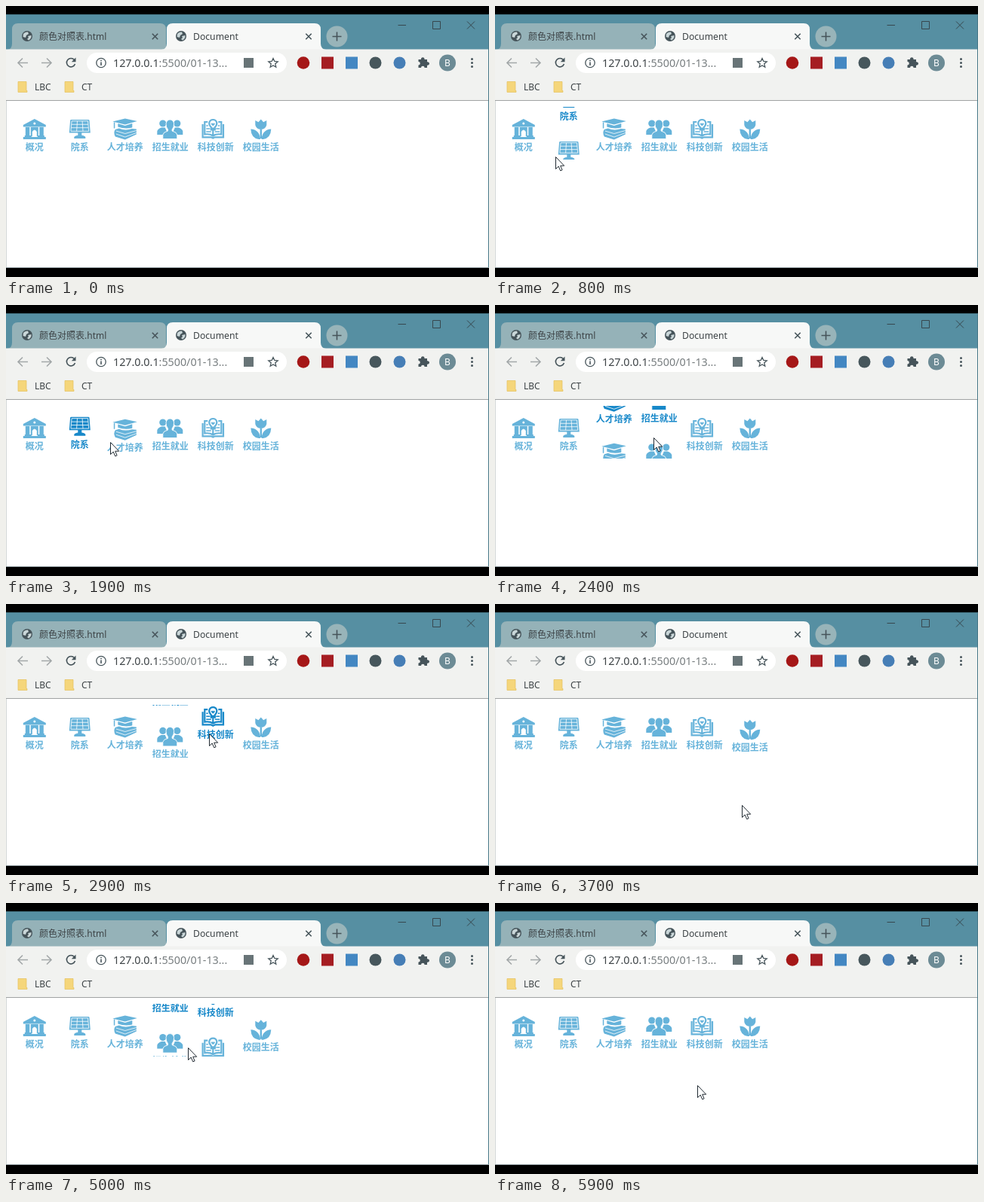
Write an HTML page that moves like this. It is 640 px wide and 360 px high and loops after 6000 ms.

```html
<!DOCTYPE html>
<html lang="zh">
<head>
<meta charset="utf-8">
<title>Document</title>
<style>
html, body { margin: 0; width: 100%; height: 100%; overflow: hidden; background: #000; }
svg { display: block; }
text { font: 12px "Noto Sans", "Noto Sans CJK SC", sans-serif; fill: #3d4346; }
.label { font: bold 12px "Noto Sans CJK SC", sans-serif; text-anchor: middle; fill: currentColor; }
.url { font-size: 14.3px; }
.line { fill: none; stroke: #46545a; stroke-width: 1.6; }
.thin { stroke-width: 1; stroke: #37474e; }
.faint { stroke: #a3a8a9; }
.gap { fill: none; stroke: #fff; stroke-width: .8; }
.normal { color: #66b3da; fill: currentColor; }
.active { color: #1788c9; fill: currentColor; }
</style>
</head>
<body>
<svg id="stage" width="640" height="360" viewBox="0 0 640 360">
  <defs>
    <g id="globe">
      <circle r="7" fill="#46545a"/>
      <path d="M-5 -3Q-3 -6 1 -5.5L2 -3L-1 -1L-2 2L-5.5 1ZM1 0L5.5 -1Q6 3 2 5.5L0 4L2 2Z" fill="#c9d6d8"/>
    </g>
    <path id="cross" class="line" d="M-3.7 -3.7L3.7 3.7M3.7 -3.7L-3.7 3.7"/>
    <path id="folder" d="M0 0H11V12H12V14H0Z" fill="#f5d67b" stroke="#e6c05c" stroke-width=".7"/>

    <g id="icon0">
      <path d="M30 16L45 24V26.5H15V24Z"/>
      <path d="M18 27H23.5V39H18ZM36.5 27H42V39H36.5ZM25 27H35V39H33V33Q30 28 27 33V39H25Z"/>
      <path d="M17 38H26V40H34V38H43V40H45V43H15V40H17Z"/>
      <circle cx="30" cy="22" r="1.5" fill="#fff"/>
    </g>
    <g id="icon1">
      <path d="M18.5 17H41.5Q42.5 17 42.7 18L44 34.5H16L17.3 18Q17.5 17 18.5 17ZM27.5 34H32.5V38H27.5ZM22.5 40Q24 37.5 30 37.5T37.5 40V42H22.5Z"/>
      <path class="gap" d="M19.3 18.8H40.7L41.9 32.3H18.1ZM26.7 19L25.8 32.3M33.3 19L34.2 32.3M18.9 23.3H41.1M18.5 27.7H41.5"/>
    </g>
    <g id="icon2">
      <path d="M13.5 19.5L30 15.5L46 19L30 23.5ZM20.5 22.3L30 25L39.5 22V27.5Q30 30 20.5 26.5ZM15 20.5H16.5V28.5H15Z"/>
      <path d="M17 30L22 28.5Q30 32 39 29L45 29.5V36.5L30 43.5L17 39.5Q14 34 17 30Z"/>
      <path class="gap" d="M18 32L30 35.5L45 31.5M18 36L30 40L45 34.5"/>
    </g>
    <g id="icon3">
      <circle cx="20" cy="22" r="4.6"/>
      <circle cx="39" cy="22" r="4.6"/>
      <path d="M12.5 37V32.5Q13 29.5 18 27.5H23L27 37ZM46.5 37V32.5Q46 29.5 41 27.5H36L32 37Z"/>
      <path stroke="#fff" stroke-width=".9" d="M20 42.5V37Q20.5 33.5 26.7 32V30Q24 27 24.2 22Q25.5 17 29.5 17T34.8 22Q35 27 32.3 30V32Q38.5 33.5 39 37V42.5Z"/>
    </g>
    <g id="icon4" transform="translate(-3.5)" fill="none" stroke="currentColor" stroke-width="2.2">
      <path d="M23 20H19V36.5Q26 35.5 30 38.5Q34 35.5 41 36.5V20H37M16.3 23V40.3H27.5L30 41.5L32.5 40.3H43.7V23M30 31V39"/>
      <path d="M21 25H23.5M21 29H26M21 33H27.5M39 25H36.5M39 29H34M39 33H32.5" stroke-width="1.5"/>
      <path d="M27.5 27Q24.5 24 25 21Q26 17 30 17T35 21Q35.5 24 32.5 27V30.5H27.5ZM28 22L30 24L32 22M28 28.7H32"/>
    </g>
    <g id="icon5">
      <path d="M22.5 18L26.7 20.2L30 16.5L33.3 20.2L37.5 18V24Q36.5 29.5 30 30Q23.5 29.5 22.5 24ZM28.8 29H31.2V42H28.8Z"/>
      <path d="M16.5 29.5Q28 30 29.3 43H27Q17 41.5 16.5 29.5ZM43.5 29.5Q32 30 30.7 43H33Q43 41.5 43.5 29.5Z"/>
    </g>
  </defs>

  <rect y="11" width="640" height="337" fill="#fff"/>
  <rect y="11" width="640" height="47" fill="#568fa2"/>

  <path d="M2 58Q8 57 8 50V31Q8 23 16 23H204Q212 23 212 31V58Z" fill="#95b2b8"/>
  <path d="M206 58Q213 57 213 50V31Q213 23 221 23H409Q417 23 417 31V50Q417 57 424 58Z" fill="#f7f8f7"/>
  <rect y="57.5" width="640" height="67.5" fill="#f1f2f0"/>
  <path d="M0 125.5H640" stroke="#a0a3a3"/>
  <path d="M0 11.5H640M639.5 11V348" stroke="#477888"/>
  <path d="M0 347.5H640" stroke="#9aa6aa"/>
  <path d="M.5 126V347" stroke="#d4d8d8"/>

  <use href="#globe" x="28" y="40"/>
  <use href="#globe" x="232" y="40"/>
  <text x="44" y="45">颜色对照表.html</text>
  <text x="248" y="45" style="font-size:12.2px">Document</text>
  <use href="#cross" x="197.5" y="40.5"/>
  <use href="#cross" x="401" y="40.5"/>
  <circle cx="438.5" cy="40.5" r="14" fill="#98b4b9"/>
  <path class="line" d="M432.5 40.5H444.5M438.5 34.5V46.5"/>
  <path class="line thin" d="M519.5 25.5H530M565.5 20.5H575.5V30.5H565.5ZM611 20.5L621 30.5M621 20.5L611 30.5"/>

  <path class="line faint" d="M29 75.5H16M22 69.5L16 75.5L22 81.5M47 75.5H60M54 69.5L60 75.5L54 81.5"/>
  <path class="line" d="M90.5 71.5A5.7 5.7 0 1 0 91.5 77"/>
  <path d="M92.5 68.5V74.2H86.8Z" fill="#46545a"/>
  <rect x="107" y="62" width="265" height="27" rx="13.5" fill="#fff"/>
  <circle class="line" cx="126" cy="75.5" r="6.2" style="stroke-width:1.3"/>
  <path class="line" d="M126 74.5V79M126 71.7V73.2"/>
  <text class="url" x="142" y="80.5">127.0.0.1<tspan fill="#777d7f">:5500/01-13...</tspan></text>
  <rect x="315" y="69" width="13" height="13" fill="#687477"/>
  <path class="line" style="stroke-width:1.3" d="M354 69.5L355.8 73.5L360.2 73.9L356.8 76.8L357.8 81.2L354 78.9L350.2 81.2L351.2 76.8L347.8 73.9L352.2 73.5Z"/>

  <circle cx="394" cy="75.5" r="8.3" fill="#a51717"/>
  <rect x="418" y="67.5" width="16" height="16" fill="#a51d22"/>
  <rect x="450" y="67.5" width="16" height="16" fill="#4387c2"/>
  <circle cx="489.5" cy="75.5" r="8" fill="#47575c"/>
  <circle cx="521.5" cy="75.5" r="8" fill="#467eb6"/>
  <path d="M546.5 71H550A2.3 2.3 0 1 1 554.5 71H558V74.3A2.3 2.3 0 1 1 558 78.7V82H554.6A2.3 2.3 0 0 0 550 82H546.5V78.6A2.3 2.3 0 0 0 546.5 74Z" fill="#46545a"/>
  <circle cx="585" cy="75.5" r="11" fill="#6c8b95"/>
  <text x="585" y="80" text-anchor="middle" style="fill:#fff">B</text>
  <g fill="#46545a"><circle cx="617.5" cy="70.5" r="1.5"/><circle cx="617.5" cy="75.5" r="1.5"/><circle cx="617.5" cy="80.5" r="1.5"/></g>

  <use href="#folder" x="16" y="100.5"/>
  <use href="#folder" x="78" y="100.5"/>
  <text x="38" y="112">LBC</text>
  <text x="100" y="112">CT</text>

  <g id="menu"></g>
  <path id="cursor" d="M.5 .5V16.5L4.2 13L6.7 18.8L9.1 17.8L6.7 12.2H11.7Z" fill="#fff" stroke="#222b33" stroke-linejoin="round"/>
</svg>
<script>
const LOOP = 6000, TICK = 100, DURATION = 500;
const LEFT = 8, TOP = 134, WIDTH = 60, HEIGHT = 70;
const labels = ["概况", "院系", "人才培养", "招生就业", "科技创新", "校园生活"];

// Pointer waypoints: time, x, y
const path = [
  [100, 36, 300], [300, 52, 262], [400, 52, 262], [673, 76, 204], [800, 80, 200],
  [1300, 100, 176], [1800, 116, 180], [1876, 128, 181], [1900, 138, 182],
  [2260, 188, 178], [2650, 248, 172], [2900, 269, 172], [3020, 308, 180],
  [3362, 326, 204], [3700, 327, 267], [3900, 328, 270], [4000, 328, 270],
  [4200, 330, 204], [4450, 330, 180], [4660, 308, 184], [4893, 248, 190],
  [5000, 241, 192], [5085, 240, 204], [5400, 268, 242], [LOOP, 268, 242]
];

function pointer(t) {
  const k = Math.max(1, path.findIndex(p => p[0] >= t));
  const [t0, x0, y0] = path[k - 1], [t1, x1, y1] = path[k];
  const u = (t - t0) / (t1 - t0);
  return [x0 + (x1 - x0) * u, y0 + (y1 - y0) * u];
}

function hovered(t) {
  const [x, y] = pointer(t);
  return y >= TOP && y < TOP + HEIGHT ? Math.floor((x - LEFT) / WIDTH) : -1;
}

// CSS "ease": cubic-bezier(.25, .1, .25, 1)
function ease(x) {
  if (x <= 0) return 0;
  if (x >= 1) return 1;
  const curve = (a, b, s) => 3 * (1 - s) * s * (a * (1 - s) + b * s) + s ** 3;
  let lo = 0, hi = 1;
  for (let i = 0; i < 24; i++) {
    const mid = (lo + hi) / 2;
    if (curve(.25, .25, mid) < x) lo = mid; else hi = mid;
  }
  return curve(.1, 1, lo);
}

// Each hover change starts a transition; a reversal takes proportionally less time
const moves = labels.map(() => [{ start: 0, from: 0, to: 0, span: 1 }]);

function progress(i, t) {
  const m = moves[i].findLast(m => m.start <= t);
  return m.from + (m.to - m.from) * ease((t - m.start) / m.span);
}

function turn(i, t, to) {
  if (!moves[i]) return;
  const from = progress(i, t);
  moves[i].push({ start: t, from, to, span: DURATION * Math.abs(to - from) || 1 });
}

for (let t = path[0][0], last = -1; t < LOOP; t++) {
  const now = hovered(t);
  if (now === last) continue;
  turn(last, t, 0);
  turn(now, t, 1);
  last = now;
}

const face = (i, name, y) => `<g class="${name}" transform="translate(0 ${y})">
  <use href="#icon${i}"/><text class="label" x="30" y="57.7">${labels[i]}</text></g>`;

const menu = document.getElementById("menu");
menu.innerHTML = labels.map((_, i) =>
  `<svg x="${LEFT + i * WIDTH - .2}" y="${TOP}" width="${WIDTH}" height="${HEIGHT}" overflow="hidden">
    <g class="strip">${face(i, "normal", 0)}${face(i, "active", -HEIGHT)}</g></svg>`).join("");
const strips = menu.querySelectorAll(".strip");
const cursor = document.getElementById("cursor");

function draw() {
  const t = Math.floor(performance.now() % LOOP / TICK) * TICK;
  strips.forEach((s, i) => s.setAttribute("transform", `translate(0 ${(progress(i, t) * HEIGHT).toFixed(2)})`));
  const [x, y] = pointer(t).map(Math.round);
  cursor.setAttribute("transform", `translate(${x} ${y})`);
  cursor.style.display = t < path[0][0] ? "none" : "";
  requestAnimationFrame(draw);
}
draw();
</script>
</body>
</html>
```
